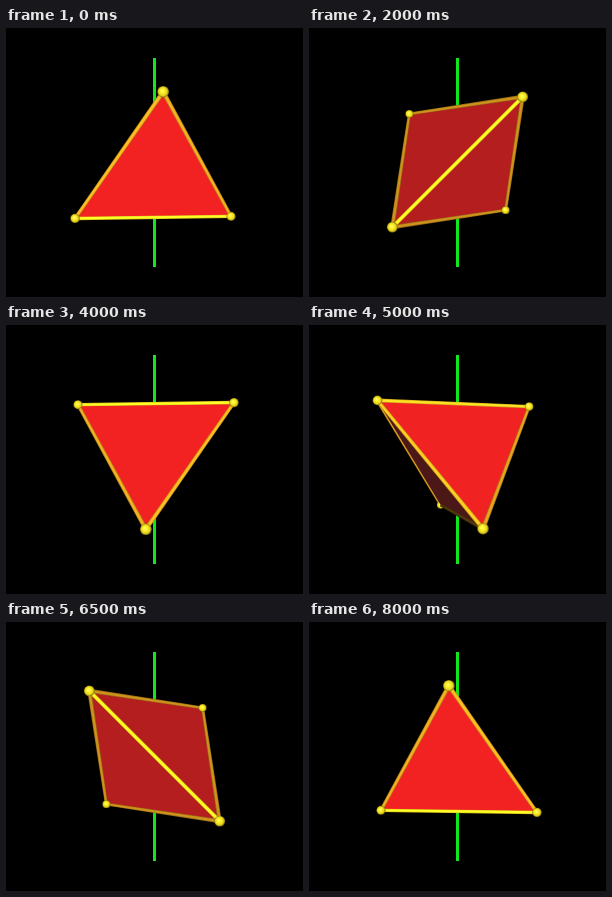
An HTML page with a canvas for the animation above (8500 ms loop, 297x269 px).

```html
<!DOCTYPE html>
<html lang="en">
<head>
<meta charset="utf-8">
<title>Rotating tetrahedron</title>
<style>
  html, body { margin: 0; width: 100%; height: 100%; overflow: hidden; background: #000; }
  canvas { display: block; width: 297px; height: 269px; }
</style>
</head>
<body>
<canvas id="stage" width="297" height="269"></canvas>
<script>
const ctx = document.getElementById('stage').getContext('2d');
const CX = 148.5, CY = 134;
const RADIUS = 78.3, HALF_HEIGHT = RADIUS / Math.SQRT2;
const CAMERA = 4.7;              // camera distance, in radii
const STEP_MS = 500, STEPS = 17;
const EDGE_RADIUS = 1.7, BALL_RADIUS = 4.6;
const EDGES = [[0, 1], [2, 3], [0, 2], [0, 3], [1, 2], [1, 3]];

const rgb = (r, g, b) => `rgb(${[r, g, b].map(v => Math.round(Math.min(255, v)))})`;

// Ten degrees per step, with one double step late in the turn.
const angleAt = step => 5 + 10 * step + (step >= 14 ? 10 : 0);

function vertex(degrees, up) {
  const a = degrees * Math.PI / 180, z = Math.cos(a);
  const scale = 1 / (1 - z / CAMERA);
  return {
    x: CX + RADIUS * Math.sin(a) * scale,
    y: CY - up * HALF_HEIGHT * scale,
    z, scale
  };
}

function polygon(points, color) {
  ctx.beginPath();
  points.forEach(([x, y]) => ctx.lineTo(x, y));
  ctx.closePath();
  ctx.fillStyle = color;
  ctx.fill();
}

function taper(p, q, width, shift, color) {
  const len = Math.hypot(q.x - p.x, q.y - p.y) || 1;
  const nx = -(q.y - p.y) / len, ny = (q.x - p.x) / len;
  const at = (v, side) => {
    const d = (side * width + shift) * v.scale;
    return [v.x + nx * d, v.y + ny * d];
  };
  polygon([at(p, 1), at(q, 1), at(q, -1), at(p, -1)], color);
}

function drawEdge(p, q) {
  const slope = (p.z - q.z) / 2;
  const light = Math.sqrt(1 - slope * slope);
  const shine = 55 * light ** 20;
  const tone = k => rgb((285 * light + 4) * k, (208 * light + shine) * k, (32 * light + 5) * k);
  taper(p, q, EDGE_RADIUS, 0, tone(0.75));
  taper(p, q, EDGE_RADIUS * 0.6, 0, tone(1));
}

function drawBall({ x, y, scale }) {
  const r = BALL_RADIUS * scale;
  const fill = ctx.createRadialGradient(x - r * 0.2, y - r * 0.2, 0, x, y, r);
  fill.addColorStop(0, '#ffff70');
  fill.addColorStop(0.35, '#fff22a');
  fill.addColorStop(0.72, '#e6d31e');
  fill.addColorStop(1, '#7d6b10');
  ctx.fillStyle = fill;
  ctx.beginPath();
  ctx.arc(x, y, r, 0, 2 * Math.PI);
  ctx.fill();
}

function drawFace(points, facing) {
  const color = rgb(Math.min(242, 16 + 285 * facing), 19 + 19 * facing, 19 + 19 * facing);
  polygon(points.map(p => [p.x, p.y]), color);
}

function draw(step) {
  const turn = angleAt(step);
  const v = [vertex(turn, 1), vertex(turn + 180, 1), vertex(turn + 90, -1), vertex(turn - 90, -1)];
  const facing = v.map(p => -p.z * Math.sqrt(2 / 3));   // face opposite each vertex
  const visible = facing.map(f => f > 0.0869);
  const inFront = ([i, j]) =>
    v[i].z + v[j].z > -0.3 && visible.some((seen, k) => seen && k !== i && k !== j);
  const drawEdges = list => list.forEach(([i, j]) => drawEdge(v[i], v[j]));
  const byDepth = [...v].sort((a, b) => a.z - b.z);

  ctx.fillStyle = '#000';
  ctx.fillRect(0, 0, 297, 269);
  ctx.fillStyle = '#10e81c';
  ctx.fillRect(147, 30, 3, 209);

  drawEdges(EDGES.filter(e => !inFront(e)));
  byDepth.filter(p => p.z < -0.75).forEach(drawBall);
  facing.forEach((f, i) => {
    if (visible[i]) drawFace(v.filter((_, k) => k !== i), f);
  });
  drawEdges(EDGES.filter(inFront));
  byDepth.filter(p => p.z >= -0.75).forEach(drawBall);
}

const start = performance.now();
function tick() {
  draw(Math.floor((performance.now() - start) / STEP_MS) % STEPS);
  requestAnimationFrame(tick);
}
tick();
</script>
</body>
</html>
```
